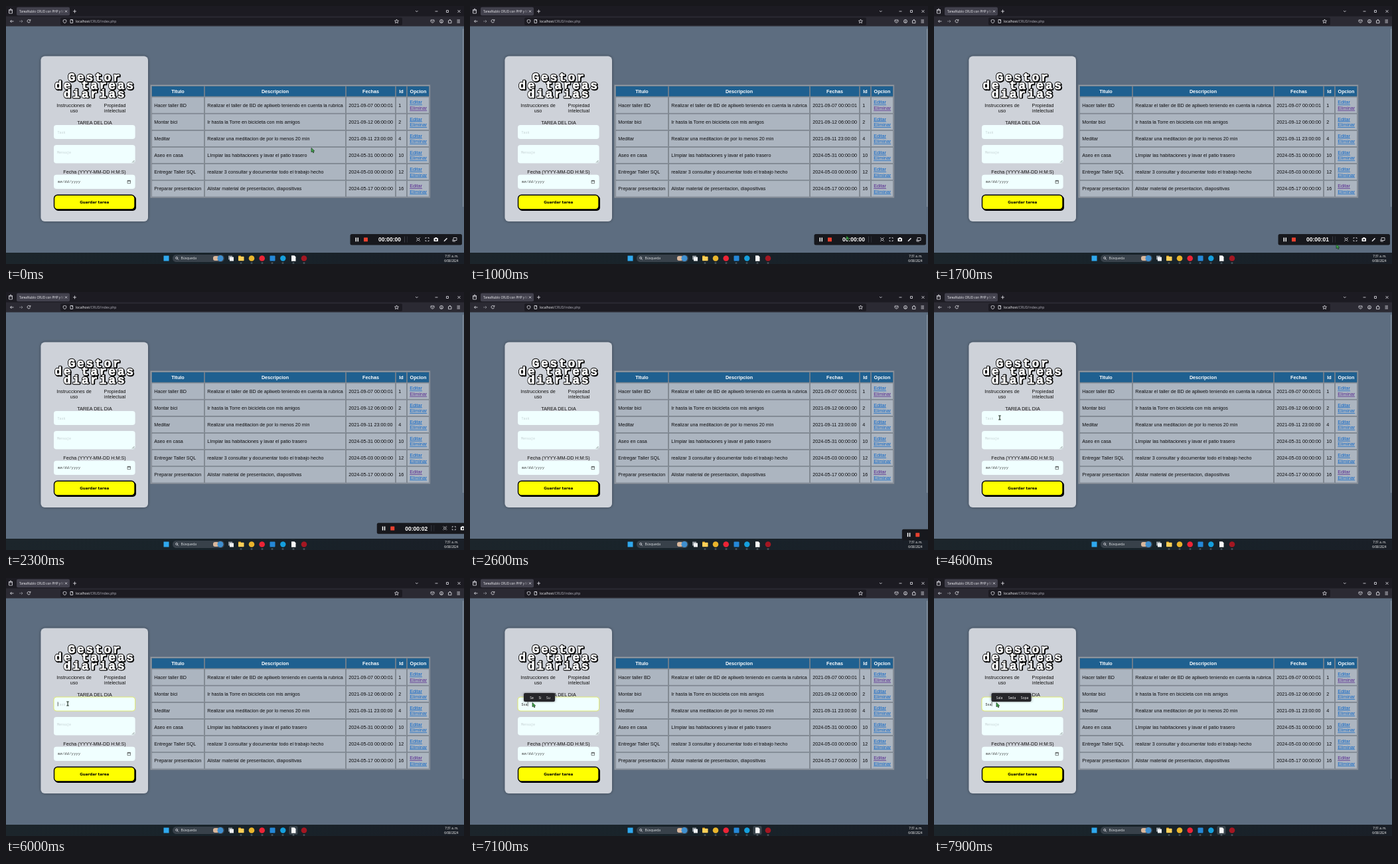
Animation, 690 px wide and 388 px high, one loop 8 s. Source, as an HTML page:

```html
<!DOCTYPE html>
<html lang="es">
<head>
<meta charset="utf-8">
<title>Gestor de tareas</title>
<style>
html, body { margin: 0; width: 100%; height: 100%; overflow: hidden; background: #5d6d80; }
svg { display: block; width: 100%; height: 100%; }
text { white-space: pre; font: 7.19px "Liberation Sans", Arial, sans-serif; }
.ui { font: 5px "Open Sans", "Noto Sans", sans-serif; }
.mono { font: 5px "Liberation Mono", monospace; }
.bold { font-weight: bold; }
.mid { text-anchor: middle; }
.end { text-anchor: end; }
.link { text-decoration: underline; }
.title { font: bold 18px "Liberation Mono", monospace; letter-spacing: 2.7px; text-anchor: middle; stroke-linejoin: round; }
.btn { font: bold 5.55px "DejaVu Sans", Verdana, sans-serif; }
.timer { font: bold 8.5px "Liberation Sans", Arial, sans-serif; }
.line { fill: none; stroke: #e4e4ea; stroke-width: .8; }
</style>
</head>
<body>
<svg id="stage" viewBox="0 0 690 388"></svg>
<script>
const stage = document.getElementById('stage');
const rect = (x, y, w, h, fill, r = 0, more = '') =>
  `<rect x="${x}" y="${y}" width="${w}" height="${h}" rx="${r}" fill="${fill}" ${more}/>`;
const disc = (x, y, r, fill) => `<circle cx="${x}" cy="${y}" r="${r}" fill="${fill}"/>`;
const text = (x, y, s, fill, cls = '', more = '') =>
  `<text x="${x}" y="${y}" fill="${fill}" class="${cls}" ${more}>${s}</text>`;
const line = (d, more = '') => `<path class="line" d="${d}" ${more}/>`;

function browser() {
  return rect(0, 0, 690, 16, '#1c1b22') + rect(0, 15.5, 690, 15, '#2b2a33') +
    rect(16, 1.8, 80, 12.4, '#42414d', 2) + rect(82, 17.5, 515, 11.4, '#1c1b22', 2) +
    line('M4.5 5.5h5v5.5h-5zM4.5 7h5M6 4.3h2') +
    `<svg x="0" y="0" width="87" height="16">${text(20, 9.8, 'TareaNublo CRUD con PHP y MySQL', '#f3f3f6', 'ui', 'style="font-size:4.7px"')}</svg>` +
    rect(80, 3, 8, 10, 'url(#fade)') +
    line('M89 6.5l3 3m0-3l-3 3M103.500 5.500v5M101 8h5') +
    line('M617 7l1.800 1.800l1.800-1.800M646.500 8h4M663.500 6.500h3v3h-3zM680.500 6l4 4m0-4l-4 4') +
    line('M11.500 23h-5m2-2l-2 2l2 2') +
    line('M20 23h5m-2-2l2 2l-2 2', 'opacity=".5"') +
    line('M36.300 21.500a2.300 2.300 0 1 0 .2 2M36.800 20v2h-2') +
    line('M88.500 20.500l2.300.7v2.300q-.5 1.600-2.300 2.200q-1.800-.6-2.300-2.200v-2.300z') +
    line('M97 20.500h3.600v5h-3.600zM98.500 20.500l2 2') +
    text(105, 24.8, 'localhost<tspan fill="#b5b5bf">/CRUD/index.php</tspan>', '#fbfbfe', 'ui') +
    line('M588.500 20l.9 2l2.100.2l-1.600 1.400l.5 2.100l-1.900-1.100l-1.900 1.100l.5-2.100l-1.600-1.400l2.100-.2z') +
    line('M640 21h5v2.500q-2.500 3.500-5 0zM641.500 22.500l1 1l1-1') +
    line('M653.500 23a2.500 2.500 0 1 1 5 0a2.500 2.500 0 1 1-5 0M654.500 24.500q1.500-1.500 3 0M655.200 22.200h1.500') +
    line('M666.500 22h1.500v-1.300h1.500v1.300h1.500v3.700h-4.500z') +
    line('M679.500 21h4.500m-4.500 2h4.500m-4.500 2h4.500') +
    rect(688, 34, 1.2, 268, '#8793a1', .6);
}

function title(s, y) {
  const layer = (dx, fill, stroke, w) =>
    text(134 + dx, y + dx, s, fill, 'title', `stroke="${stroke}" stroke-width="${w}"`);
  return layer(.9, '#000', '#000', 2.4) + layer(0, '#000', '#000', 2.4) + layer(0, '#fff', '#fff', .7);
}

function card() {
  const ink = '#111', pale = '#c4d0d2';
  const field = (y, h) => rect(72, y, 122.6, h, '#f0ffff', 4);
  return rect(52.5, 75.5, 161.5, 248.5, '#ced2d9', 6, 'filter="url(#shade)"') +
    title('Gestor', 113) + title('de tareas', 125.3) + title('diarias', 137.5) +
    text(102.500, 151.600, 'Instrucciones de', ink, 'mid') + text(102.500, 160, 'uso', ink, 'mid') +
    text(164, 151.600, 'Propiedad', ink, 'mid') + text(164, 160, 'intelectual', ink, 'mid') +
    text(133.500, 177.600, 'TAREA DEL DIA', ink, 'mid') + field(179, 21) +
    field(209, 27.600) + text(77, 221.500, 'Mensaje', pale, 'mono') +
    line('M190 235.500l3.500-3.500m-1.500 3.500l1.500-1.500', 'style="stroke:#555;stroke-width:.6"') +
    text(133.500, 252.200, 'Fecha (YYYY-MM-DD H:M:S)', ink, 'mid') + field(253.700, 21.300) +
    text(78, 266, 'mm/dd/yyyy', '#333', 'mono', 'style="letter-spacing:.45px;font-style:italic"') +
    line('M183 262.500h4.500v4.200h-4.500zM183 263.600h4.500M184.200 261.700v1M186.300 261.700v1', 'style="stroke:#333;stroke-width:.6"') +
    rect(73.500, 285.500, 122.500, 22.500, '#000', 5) +
    rect(72.500, 284.300, 121.500, 21.600, '#ff0', 5, 'stroke="#000" stroke-width="1.400"') +
    text(133.200, 297.200, 'Guardar tarea', '#000', 'btn mid');
}

const cols = [219, 299, 512, 587, 604, 638];
const rows = [
  ['Hacer taller BD', 'Realizar el taller de BD de apliweb teniendo en cuenta la rubrica', '2021-09-07 00:00:01', 1],
  ['Montar bici', 'Ir hasta la Torre en bicicleta con mis amigos', '2021-09-12 06:00:00', 2],
  ['Meditar', 'Realizar una meditacion de por lo menos 20 min', '2021-09-11 23:00:00', 4],
  ['Aseo en casa', 'LImpiar las habitaciones y lavar el patio trasero', '2024-05-31 00:00:00', 10],
  ['Entregar Taller SQL', 'realizar 3 consultar y documentar todo el trabajo hecho', '2024-05-03 00:00:00', 12],
  ['Preparar presentacion', 'Alistar material de presentacion, diapositivas', '2024-05-17 00:00:00', 16]
];

function table() {
  const blue = '#0b66c8', visited = '#55278f';
  const cell = (c, y, h, fill) =>
    rect(cols[c] + .6, y, cols[c + 1] - cols[c] - 1.2, h, fill, 0, 'stroke="#6f7780" stroke-width=".6"');
  let s = rect(217.500, 118.500, 421.500, 170, '#979fa9', 0, 'stroke="#737c87" stroke-width=".8"');
  ['Titulo', 'Descripcion', 'Fechas', 'Id', 'Opcion'].forEach((name, c) => {
    s += cell(c, 120.500, 15.500, '#1f6090') +
      text((cols[c] + cols[c + 1]) / 2, 130.800, name, '#fff', 'bold mid');
  });
  rows.forEach((row, i) => {
    const y = 137 + i * 25.150;
    for (let c = 0; c < 5; c++) s += cell(c, y, 24.2, '#acb5c0');
    row.forEach((v, c) => s += text(cols[c] + 4.2, y + 14.6, v, '#0c0c0e'));
    s += text(608.200, y + 10.400, 'Editar', i === 5 ? visited : blue, 'link') +
      text(608.200, y + 18.900, 'Eliminar', i === 0 ? visited : blue, 'link');
  });
  return s;
}

function taskbar() {
  return rect(0, 371, 690, 17, 'url(#bar)') +
    rect(237.500, 375.500, 8, 8, '#2fa8ee') +
    rect(251, 374, 78, 11, '#38414a', 5.500) +
    line('M255.700 378.900a1.500 1.500 0 1 1 3 0a1.500 1.500 0 1 1-3 0M258.300 380.200l1.500 1.500') +
    text(263.500, 381.300, 'Búsqueda', '#dfe3e6', 'ui') +
    rect(312, 376, 9, 7, '#d9b79c', 3) + disc(323, 379.500, 4.500, '#3f8fcf') +
    rect(335, 375.500, 6, 6, '#8d959c') + rect(337, 377.500, 6, 6, '#eef1f3') +
    rect(350, 375.500, 4, 3, '#e0a21c', .5) + rect(350, 376.700, 8.500, 6.500, '#ffd058', .7) +
    disc(370, 379.500, 4.300, '#e9b52c') + disc(385.700, 379.500, 4.300, '#ec2436') +
    rect(397.500, 375.500, 8, 8, '#2588d8', 1) + disc(417.300, 379.500, 4.200, '#159fdd') +
    disc(449, 379.500, 4.300, '#a31722') +
    [354, 370, 386, 401, 417, 433, 449].map(x => rect(x - 1.5, 386.200, 3, .8, '#98a4ad', .4)).join('') +
    text(681.500, 378.400, '7:31 a. m.', '#fff', 'ui end', 'style="font-size:4.500px"') +
    text(681.500, 384.600, '6/08/2024', '#fff', 'ui end', 'style="font-size:4.500px"');
}

function recorder() {
  return rect(518.500, 343, 168.500, 16.500, '#17181d', 2.500) +
    rect(526.500, 348.300, 1.500, 6, '#fff') + rect(529.500, 348.300, 1.500, 6, '#fff') +
    rect(539, 348.300, 6, 6, '#e8412f', .6) +
    text(561, 354.300, '', '#fff', 'timer', 'id="timer"') +
    rect(600, 346.500, 1, 9, '#3a3c44') + rect(604, 346.500, 1, 9, '#2c2e35') +
    line('M618 349l1-1m4 0l1 1m0 4l-1 1m-4 0l-1-1M619.300 351a1.700 1.700 0 1 1 3.400 0a1.700 1.700 0 1 1-3.400 0') +
    line('M632 350v-1.500h1.500m2 0h1.500v1.500m0 2v1.500h-1.500m-2 0h-1.500v-1.500') +
    rect(644.500, 349, 6.500, 5, '#f2f2f4', .8) + rect(646.300, 348, 3, 2, '#f2f2f4') + disc(647.800, 351.500, 1.300, '#17181d') +
    line('M660 353.800l4.500-4.500', 'style="stroke-width:1.600"') +
    line('M674 348.500h5v4h-5zM673 351v3h4');
}

stage.innerHTML = `<defs>
  <linearGradient id="fade"><stop stop-color="#42414d" stop-opacity="0"/><stop offset="1" stop-color="#42414d"/></linearGradient>
  <linearGradient id="bar"><stop stop-color="#1c252b"/><stop offset=".5" stop-color="#18232a"/><stop offset="1" stop-color="#1a1f27"/></linearGradient>
  <filter id="shade" x="-10%" y="-10%" width="120%" height="120%"><feDropShadow dx="0" dy="0" stdDeviation="2" flood-opacity=".4"/></filter>
  </defs>` + rect(0, 0, 690, 388, '#5d6d80') + browser() + card() + table() +
  rect(72, 179, 122.6, 21, 'none', 4, 'id="glow" stroke="#dfe870" stroke-width="1"') +
  text(77.500, 191.500, '', '#c4d0d2', 'mono', 'id="entry"') +
  rect(78, 186.300, .6, 6.500, '#111', 0, 'id="caret"') +
  '<g id="popup"></g>' + taskbar() +
  rect(426.500, 373, 13, 13, '#3a444c', 2, 'id="active"') +
  '<path d="M430 375.300h4.500l2 2v6.500h-6.500z" fill="#f7f8f9"/>' +
  `<g id="recorder">${recorder()}</g>
  <path id="arrow" d="M0 -3.500v6.300l1.500-1.300l1.200 2.300l1.200-.6l-1.100-2.200h1.900z" fill="#3fae4a" stroke="#16301a" stroke-width=".7"/>
  <path id="beam" d="M-1.800 -3h3.600M0 -3v6M-1.800 3h3.600" fill="none" stroke="#1c2b1e" stroke-width="1.100"/>`;

const el = {};
for (const id of ['glow', 'entry', 'caret', 'popup', 'active', 'recorder', 'timer', 'arrow', 'beam'])
  el[id] = document.getElementById(id);
const show = (node, on) => node.setAttribute('visibility', on ? 'visible' : 'hidden');
const move = (node, x, y) => node.setAttribute('transform', `translate(${x} ${y})`);

// time, x, y
const path = [
  [0, 460, 217], [999, 460, 217], [1000, 567, 349], [1200, 567, 349], [1700, 606, 362], [2100, 640, 372],
  [3700, 0, 298], [3900, 45, 314], [4200, 135, 255], [4400, 145, 195], [4600, 99, 189],
  [4800, 93, 189], [6600, 93, 189], [6800, 94, 191], [8000, 94, 191]
];
function pointer(t) {
  const i = path.findIndex(p => p[0] > t), a = path[i - 1], b = path[i];
  const k = (t - a[0]) / (b[0] - a[0]);
  return [a[1] + (b[1] - a[1]) * k, a[2] + (b[2] - a[2]) * k];
}

const popup = (x, w, words) => rect(x, 173, w, 13, '#25262b', 2, 'filter="url(#shade)"') +
  words.map((s, i) => text(x + 12 + i * (w - 22) / 2, 181.500, s, '#fff', 'ui mid')).join('');
const early = popup(81, 47, ['Se', 'Si', 'Su']);
const late = popup(86.500, 60, ['Sala', 'Seda', 'Sopa']);
let shown = '';

function draw(t) {
  const [x, y] = pointer(t);
  const beam = t >= 4500 && t < 6600;
  move(el.arrow, x, y);
  move(el.beam, x, y);
  show(el.beam, beam);
  show(el.arrow, !beam && (t < 2100 || t >= 3700) && !(t >= 6600 && t < 6800));

  const slide = Math.max(0, (t - 2000) / 700) ** 1.72;
  move(el.recorder, 172 * slide, 18 * slide);
  show(el.recorder, t < 2700);
  el.timer.textContent = '00:00:0' + (t < 1200 ? 0 : t < 2200 ? 1 : 2);

  const typed = t < 6600 ? '' : t < 6800 ? 'S' : t < 7100 ? 'Ss' : 'Ssa';
  el.entry.textContent = typed || 'Task';
  el.entry.setAttribute('fill', typed ? '#222' : '#c4d0d2');
  el.glow.setAttribute('opacity', Math.min(1, Math.max(0, (t - 4700) / 300)));
  el.caret.setAttribute('x', 77.8 + typed.length * 3);
  show(el.caret, t >= 4700 && (typed || t < 5200 || t >= 5700 && t < 6300));
  show(el.active, t >= 6000);

  const next = t < 6800 ? '' : t < 7300 ? early : late;
  if (next !== shown) el.popup.innerHTML = shown = next;
}

function tick(now) {
  draw(now % 8000);
  requestAnimationFrame(tick);
}
draw(0);
requestAnimationFrame(tick);
</script>
</body>
</html>
```
